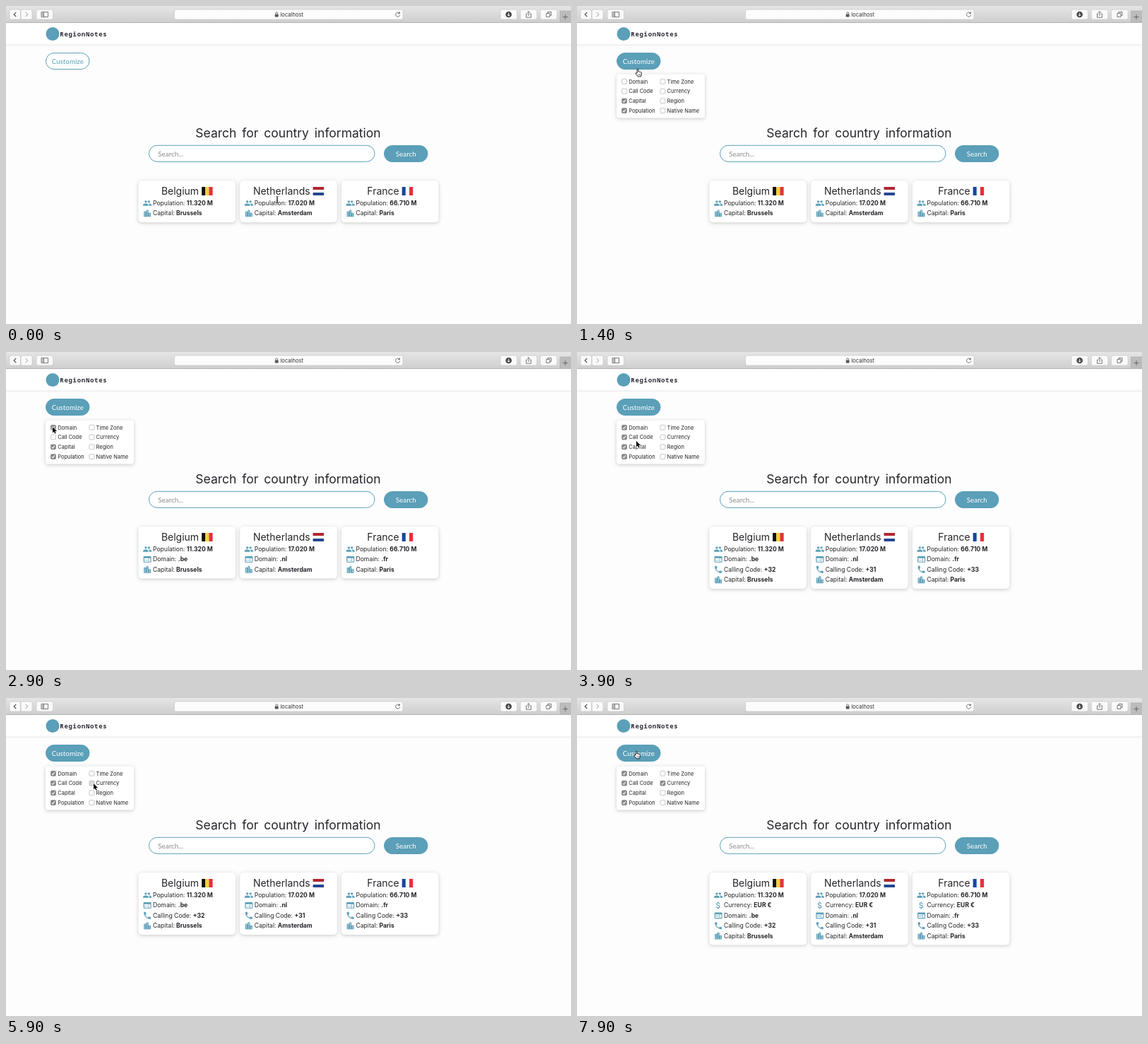
Write an HTML page with a canvas that moves like this. It is 800 px wide and 450 px high and loops after 8000 ms.

```html
<!DOCTYPE html>
<html lang="en">
<head>
<meta charset="utf-8">
<title>Country search</title>
<style>
html, body { margin: 0; width: 100%; height: 100%; overflow: hidden; background: #fefdfe; }
canvas { display: block; width: 800px; height: 450px; }
</style>
</head>
<body>
<canvas id="stage"></canvas>
<script>
const LOOP = 8000, STEP = 100;
const TEAL = '#5b9fb8', INK = '#25252b';
const SANS = 'Inter, "Noto Sans", sans-serif';
const LATO = 'Lato, "Open Sans", sans-serif';
const MONO = '"Noto Sans Mono", "DejaVu Sans Mono", monospace';

const canvas = document.getElementById('stage');
const ctx = canvas.getContext('2d');
const ratio = window.devicePixelRatio || 1;
canvas.width = 800 * ratio;
canvas.height = 450 * ratio;

const OPEN = 1200, HOVER = 1000;
const CLICK = { domain: 2600, code: 3600, currency: 6000 };

// time, x, y of the pointer's hot spot
const PATH = [
  [0, 384, 274], [900, 86, 78], [1200, 86, 78], [1400, 86, 89],
  [1800, 68, 106], [2200, 66, 106], [2900, 66, 106], [3200, 67, 120],
  [3400, 68, 120], [3600, 68, 120], [3900, 84, 126], [4400, 112, 128],
  [4700, 113, 122], [5200, 113, 122], [5300, 114, 123], [5500, 114, 123],
  [5800, 124, 121], [6000, 124, 121], [6400, 104, 117], [6500, 92.5, 118],
  [6700, 92.5, 118], [7600, 84, 75]
];
// pointer shape from each time on
const SHAPES = [
  [0, 'beam'], [200, 'arrow'], [900, 'hand'], [1500, 'arrow'],
  [6300, 'beam'], [6900, 'arrow'], [7400, 'hand']
];

const ICONS = {
  people: 'M16 11c1.66 0 3-1.34 3-3s-1.34-3-3-3-3 1.34-3 3 1.34 3 3 3zm-8 0c1.66 0 3-1.34 3-3S9.66 5 8 5 5 6.34 5 8s1.34 3 3 3zm0 2c-2.33 0-7 1.17-7 3.5V19h14v-2.5C15 14.17 10.33 13 8 13zm8 0l-.97.05C16.2 13.9 17 15 17 16.5V19h6v-2.5c0-2.33-4.67-3.5-7-3.5z',
  dollar: 'M11.8 10.9c-2.27-.59-3-1.2-3-2.15 0-1.09 1.01-1.85 2.7-1.85 1.78 0 2.44.85 2.5 2.1h2.21c-.07-1.72-1.12-3.3-3.21-3.81V3h-3v2.16c-1.94.42-3.5 1.68-3.5 3.61 0 2.31 1.91 3.46 4.7 4.13 2.5.6 3 1.48 3 2.41 0 .69-.49 1.79-2.7 1.79-2.06 0-2.87-.92-2.98-2.1h-2.2c.12 2.19 1.76 3.42 3.68 3.83V21h3v-2.15c1.95-.37 3.5-1.5 3.5-3.55 0-2.84-2.43-3.81-4.7-4.4z',
  web: 'M20 4H4Q2 4 2 6V18q0 2 2 2H20q2 0 2-2V6q0-2-2-2zm-5 14H4v-4h11zm0-5H4V9h11zm5 5h-4V9h4z',
  phone: 'M6.6 10.8c1.45 2.8 3.8 5.1 6.6 6.6l2.2-2.2q.5-.5 1-.25 1.7.55 3.6.55 1 0 1 1V20q0 1-1 1C10.6 21 3 13.4 3 4q0-1 1-1h3.5q1 0 1 1 0 1.9.6 3.6.15.5-.3 1z',
  city: 'M15 11V5l-3-3-3 3v2H3v14h18V11zM7 19H5v-2h2zm0-4H5v-2h2zm0-4H5V9h2zm6 8h-2v-2h2zm0-4h-2v-2h2zm0-4h-2V9h2zm0-4h-2V5h2zm6 12h-2v-2h2zm0-4h-2v-2h2z'
};
for (const key in ICONS) ICONS[key] = new Path2D(ICONS[key]);

const ARROW = new Path2D('M0 0V8.4L1.9 6.6 3.2 9.6 4.6 9 3.4 6.1H6Z');
const HAND = new Path2D('M-.9 6V.9a.9.9 0 0 1 1.8 0V4q1.1-.7 1.7.3 1-.5 1.5.4 1.2-.3 1.2 1V7.5Q5.2 9 4.4 10.8H.2Q-1 9-2.9 6.9-3.5 5.7-2.3 5.7Z');

const COUNTRIES = [
  { name: 'Belgium', flag: ['#111', '#fbd13c', '#e5303c'],
    people: '11.320 M', domain: '.be', code: '+32', capital: 'Brussels' },
  { name: 'Netherlands', flag: ['#b3242f', '#fff', '#25478f'], rows: true,
    people: '17.020 M', domain: '.nl', code: '+31', capital: 'Amsterdam' },
  { name: 'France', flag: ['#17479e', '#fff', '#ee2b39'],
    people: '66.710 M', domain: '.fr', code: '+33', capital: 'Paris' }
];

function box(x, y, w, h, r, fill, stroke, width = 1) {
  ctx.beginPath();
  ctx.roundRect(x, y, w, h, r);
  if (fill) { ctx.fillStyle = fill; ctx.fill(); }
  if (stroke) { ctx.strokeStyle = stroke; ctx.lineWidth = width; ctx.stroke(); }
}

function panel(x, y, w, h, r) {
  ctx.save();
  ctx.shadowColor = 'rgba(0,0,0,.2)';
  ctx.shadowBlur = 5 * ratio;
  ctx.shadowOffsetY = 1.2 * ratio;
  box(x, y, w, h, r, '#fff');
  ctx.restore();
}

// y is the middle of the capitals; returns the width
function text(s, x, y, size, { font = SANS, weight = 400, color = INK, align = 'left' } = {}) {
  ctx.font = `${weight} ${size}px ${font}`;
  ctx.textAlign = align;
  ctx.fillStyle = color;
  ctx.fillText(s, x, y + size * 0.36);
  return ctx.measureText(s).width;
}

function line(d, color = '#555', width = 1) {
  ctx.strokeStyle = color;
  ctx.lineWidth = width;
  ctx.stroke(new Path2D(d));
}

function toolbar() {
  const shade = ctx.createLinearGradient(0, 0, 0, 23);
  shade.addColorStop(0, '#e6e5e6');
  shade.addColorStop(1, '#d0cfd0');
  ctx.fillStyle = shade;
  ctx.fillRect(0, 0, 800, 23);
  ctx.fillStyle = '#b4b3b4';
  ctx.fillRect(0, 23, 800, 1);

  for (const [x, w] of [[5, 15.5], [21.2, 15.8], [43, 23.5], [700, 23.5], [728.3, 23.5], [756.6, 23.5]])
    box(x, 5, w, 14, 2.5, '#fbfafb', '#c3c2c3', 0.6);
  line('M14.3 8.8L11.2 12 14.3 15.2', '#444', 1.1);
  line('M27.6 8.8L30.7 12 27.6 15.2', '#999', 1);
  line('M50 8.5H59.5V15.5H50ZM53.5 8.5V15.5M51 10.5H52.6M51 12H52.6M51 13.5H52.6', '#555', 0.8);

  box(238.5, 5, 323.5, 14, 2.5, '#fdfcfd', '#c3c2c3', 0.6);
  box(380.8, 11.5, 4.8, 4, 0.5, '#555');
  line('M381.8 11.6V10.2a1.4 1.4 0 0 1 2.8 0V11.6', '#555', 0.8);
  text('localhost', 388.5, 12.1, 7.6, { color: '#333' });
  line('M557.2 10.2A3.1 3.1 0 1 0 557.8 12.6M557.5 8.2V10.6H555', '#555', 0.8);

  ctx.fillStyle = '#444';
  ctx.beginPath();
  ctx.arc(711.7, 12, 4.3, 0, 7);
  ctx.fill();
  line('M711.7 9.6V14M709.8 12.4L711.7 14.2 713.6 12.4', '#fff', 1);
  line('M738.3 11H736.6V16.2H743.4V11H741.7M740 14V7.8M738.2 9.4L740 7.6 741.8 9.4', '#555', 0.8);
  line('M765 10.4H770V15.4H765ZM767 10.2V8.4H772V13.4H770.2', '#555', 0.8);

  ctx.fillStyle = '#bdbcbd';
  ctx.fillRect(784.5, 7, 15.5, 16);
  line('M784.5 23V7H800', '#aaa', 0.6);
  line('M788.5 15.5H795.5M792 12V19', '#555', 0.8);
}

function header() {
  ctx.fillStyle = '#fff';
  ctx.fillRect(0, 24, 800, 31);
  ctx.fillStyle = '#e3e4ea';
  ctx.fillRect(0, 54.6, 800, 1);
  ctx.fillStyle = '#f5f5f8';
  ctx.fillRect(0, 55.6, 800, 1);
  ctx.fillStyle = TEAL;
  ctx.beginPath();
  ctx.arc(66, 39.5, 9.5, 0, 7);
  ctx.fill();
  ctx.letterSpacing = '0.7px';
  text('RegionNotes', 76.3, 40, 9, { font: MONO, weight: 600, color: '#2e2e38' });
  ctx.letterSpacing = '0px';
}

function pill(x, y, w, label, filled) {
  box(x + 0.5, y + 0.5, w - 1, 23, 11.5, filled ? TEAL : '#fff', TEAL);
  text(label, x + w / 2, y + 12.2, 9.8, { font: LATO, color: filled ? '#fff' : TEAL, align: 'center' });
}

function check(label, x, y, on, pressed) {
  box(x - 3.4, y - 3.4, 6.8, 6.8, 1.3, on ? '#87868a' : pressed ? '#dcdcdc' : '#fff', on ? '#7c7b7f' : '#adacb0', 0.7);
  if (on) line(`M${x - 1.9} ${y + 0.2}l1.3 1.6 2.5 -3.6`, '#fff', 1.1);
  text(label, x + 6.2, y, 7.5);
}

function menu(t) {
  panel(56, 96.5, 125, 62, 4);
  const held = key => t >= CLICK[key] - 200;
  const left = [['Domain', t >= CLICK.domain, held('domain')], ['Call Code', t >= CLICK.code, held('code')],
    ['Capital', true], ['Population', true]];
  const right = [['Time Zone'], ['Currency', t >= CLICK.currency, held('currency')], ['Region'], ['Native Name']];
  left.forEach(([s, on, down], i) => check(s, 67, 106.8 + i * 13.75, on, down));
  right.forEach(([s, on, down], i) => check(s, 121.4, 106.8 + i * 13.75, on, down));
}

function flag(x, y, country) {
  country.flag.forEach((color, i) => {
    ctx.fillStyle = color;
    if (country.rows) ctx.fillRect(x, y + i * 4, 15.5, 4);
    else ctx.fillRect(x + i * 5.17, y, 5.17, 12);
  });
}

function card(country, x, t) {
  const rows = [['people', 'Population:', country.people]];
  if (t >= CLICK.currency) rows.push(['dollar', 'Currency:', 'EUR €']);
  if (t >= CLICK.domain) rows.push(['web', 'Domain:', country.domain]);
  if (t >= CLICK.code) rows.push(['phone', 'Calling Code:', country.code]);
  rows.push(['city', 'Capital:', country.capital]);

  panel(x, 247, 137.5, 30.4 + rows.length * 14.4, 5);
  ctx.font = `400 14px ${SANS}`;
  const w = ctx.measureText(country.name).width;
  const start = x + 68.75 - (w + 19.5) / 2;
  text(country.name, start, 262, 14);
  flag(start + w + 4, 256, country);

  rows.forEach(([icon, label, value], i) => {
    const y = 279 + i * 14.4;
    ctx.save();
    ctx.translate(x + 6, y - 6.6);
    ctx.scale(0.55, 0.55);
    ctx.fillStyle = TEAL;
    ctx.fill(ICONS[icon], 'evenodd');
    ctx.restore();
    const used = text(label + ' ', x + 20.5, y, 8.6);
    text(value, x + 20.5 + used, y, 8.6, { weight: 700 });
  });
}

function pointerAt(t) {
  const next = PATH.findIndex(p => p[0] > t);
  if (next < 0) return PATH[PATH.length - 1].slice(1);
  const [t0, x0, y0] = PATH[next - 1], [t1, x1, y1] = PATH[next];
  const u = (t - t0) / (t1 - t0), k = u * u * (3 - 2 * u);
  return [x0 + (x1 - x0) * k, y0 + (y1 - y0) * k];
}

function pointer(t) {
  const [x, y] = pointerAt(t);
  const shape = SHAPES.filter(s => s[0] <= t).pop()[1];
  ctx.save();
  ctx.translate(x, y);
  ctx.lineJoin = 'round';
  if (shape === 'beam') {
    line('M-1.7 -4.5Q0 -4.5 0 -3.3V3.3Q0 4.5 -1.7 4.5M1.7 -4.5Q0 -4.5 0 -3.3V3.3Q0 4.5 1.7 4.5M-1 1.2H1', '#222', 0.9);
  } else if (shape === 'hand') {
    ctx.fillStyle = '#fff';
    ctx.fill(HAND);
    ctx.strokeStyle = '#111';
    ctx.lineWidth = 0.9;
    ctx.stroke(HAND);
    line('M1 7.2V9.2M2.4 7.2V9.2M3.7 7.2V9.2', '#111', 0.5);
  } else {
    ctx.strokeStyle = '#fff';
    ctx.lineWidth = 1.2;
    ctx.stroke(ARROW);
    ctx.fillStyle = '#000';
    ctx.fill(ARROW);
  }
  ctx.restore();
}

function draw(t) {
  ctx.setTransform(ratio, 0, 0, ratio, 0, 0);
  ctx.fillStyle = '#fefdfe';
  ctx.fillRect(0, 0, 800, 450);
  toolbar();
  header();
  pill(56, 66, 62.5, 'Customize', t >= HOVER);
  if (t >= OPEN) menu(t);

  ctx.wordSpacing = '3px';
  text('Search for country information', 399.5, 179.8, 17.5, { align: 'center' });
  ctx.wordSpacing = '0px';
  box(202.5, 197.3, 319.5, 23, 11.5, '#fff', TEAL);
  text('Search...', 215.3, 209.2, 9.8, { font: LATO, color: '#8b8b90' });
  pill(535, 197, 62.5, 'Search', true);

  COUNTRIES.forEach((c, i) => card(c, 187.5 + i * 143.75, t));
  pointer(t);
}

function tick() {
  const t = performance.now() % LOOP;
  draw(Math.floor(t / STEP) * STEP);
  requestAnimationFrame(tick);
}
tick();
</script>
</body>
</html>
```
